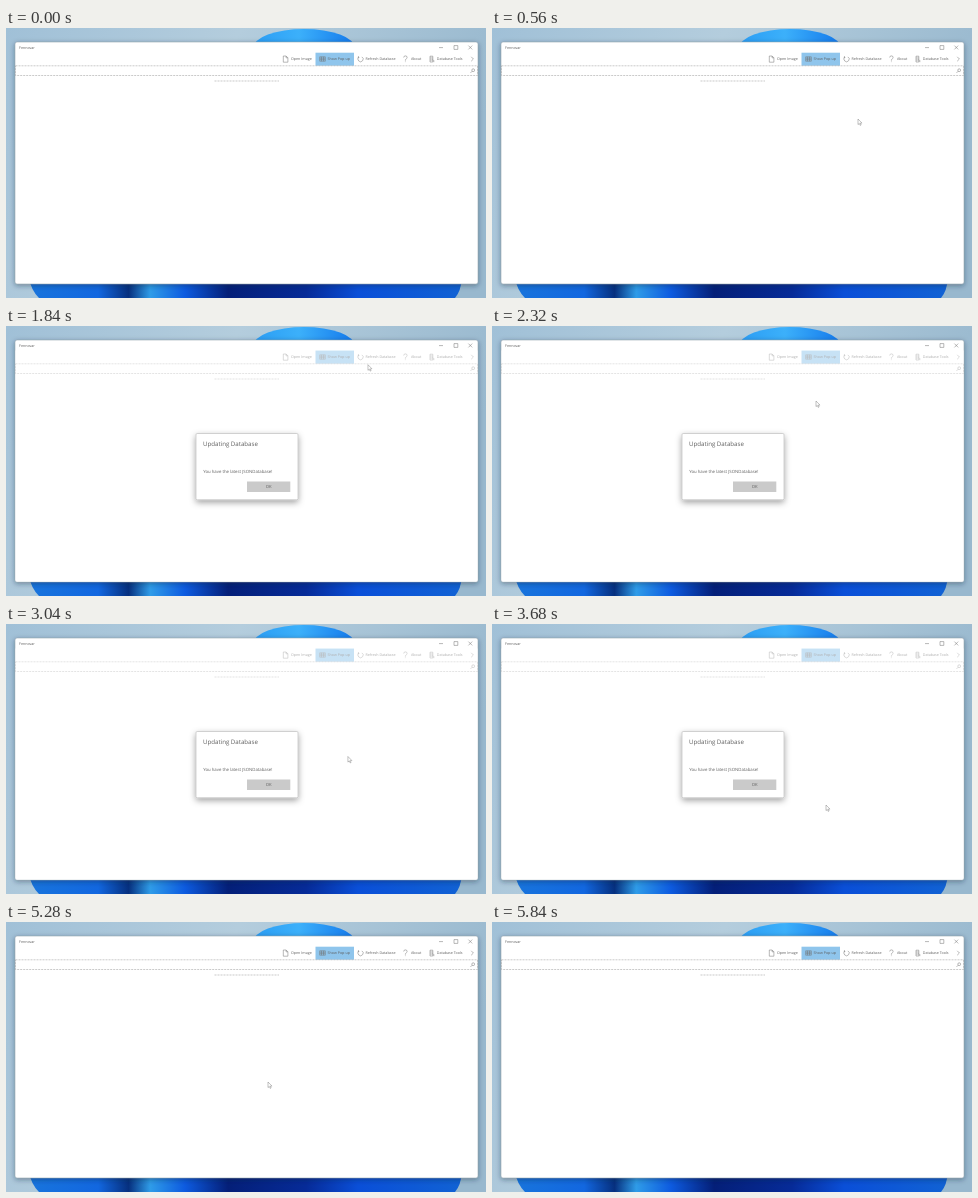
An HTML page for the animation above (5920 ms loop, 480 px wide and 270 px high).

```html
<!DOCTYPE html>
<html lang="en">
<head>
<meta charset="utf-8">
<title>Database refresh</title>
<style>
html, body { margin: 0; width: 100%; height: 100%; overflow: hidden; background: #adc8da; }
svg { display: block; width: 100%; height: 100%; }
text { font-family: "Open Sans", "Noto Sans", sans-serif; font-size: 3.65px; fill: #5e5e5e; text-rendering: geometricPrecision; }
.icon { fill: none; stroke: #707070; stroke-width: .5; }
.dash { fill: none; stroke: #a6a6a6; stroke-width: .6; stroke-dasharray: 2 1; }
</style>
</head>
<body>
<svg viewBox="0 0 480 270" preserveAspectRatio="none">
  <defs>
    <linearGradient id="sky" x2="1" y2=".3">
      <stop offset="0" stop-color="#a0c0d7"/>
      <stop offset=".45" stop-color="#b4cddd"/>
      <stop offset="1" stop-color="#98b8ce"/>
    </linearGradient>
    <linearGradient id="crest">
      <stop offset="0" stop-color="#2a9df4"/>
      <stop offset=".45" stop-color="#3cb0fa"/>
      <stop offset="1" stop-color="#1379ec"/>
    </linearGradient>
    <linearGradient id="base">
      <stop offset="0" stop-color="#1874dc"/>
      <stop offset=".16" stop-color="#1267e0"/>
      <stop offset=".23" stop-color="#06307f"/>
      <stop offset=".28" stop-color="#2f9ce8"/>
      <stop offset=".36" stop-color="#0d5be0"/>
      <stop offset=".46" stop-color="#041f78"/>
      <stop offset=".64" stop-color="#062b98"/>
      <stop offset=".76" stop-color="#0a4fd8"/>
      <stop offset="1" stop-color="#1162d4"/>
    </linearGradient>
    <filter id="winShadow" x="-5%" y="-5%" width="110%" height="115%">
      <feDropShadow dx="0" dy="1.5" stdDeviation="2.5" flood-color="#12283a" flood-opacity=".42"/>
    </filter>
    <filter id="boxShadow" x="-20%" y="-20%" width="140%" height="150%">
      <feDropShadow dx="0" dy="2.5" stdDeviation="3" flood-opacity=".38"/>
    </filter>
  </defs>

  <rect width="480" height="270" fill="url(#sky)"/>
  <ellipse cx="298" cy="20" rx="51" ry="19" fill="url(#crest)"/>
  <path d="M23 250 Q25 262 33 270 H449 Q455 263 456 250Z" fill="url(#base)"/>

  <rect x="9" y="14" width="463" height="242" rx="2" fill="#fff" stroke="#8195a3" stroke-width=".5" filter="url(#winShadow)"/>
  <text x="13" y="20.8">Fennovar</text>
  <path class="icon" d="M433 19.6h4M448 17.6h3.8v3.8h-3.8zM462.4 17.6l3.8 3.8m0-3.8l-3.8 3.8"/>

  <rect x="309.5" y="24.7" width="38.5" height="13" fill="#8fc5ec"/>
  <rect id="hover" x="348" y="24.7" width="45.2" height="13" fill="#bdbdbd"/>
  <g id="labels"></g>
  <g class="icon">
    <path d="M277.3 28h2.8l1.8 1.8v4.4h-4.6zM280.1 28v1.8h1.8"/>
    <path d="M313.7 28.8h5.6v4.4h-5.6zM313.7 30.2h5.6M313.7 31.7h5.6M315.5 28.8v4.4M317.5 28.8v4.4"/>
    <path d="M352.9 29.1A2.6 2.6 0 1 0 355.9 28.9M352.2 28.1l.8 1.2-1.4.5"/>
    <path d="M397.7 29.5q0-1.6 1.7-1.6t1.7 1.5q0 1-1 1.6t-.7 1.7M399.4 33.5v.6"/>
    <path d="M424 28.2h2.8v5.8h-2.8zM424 30h2.8M424 32h2.8M426.8 31.6l1 1v1.6"/>
    <path d="M465.2 28.8l2.2 2.2-2.2 2.2"/>
    <circle cx="467.2" cy="42.2" r="1.4"/>
    <path d="M466.2 43.2l-1.7 1.7"/>
  </g>
  <rect class="dash" x="9.5" y="37.8" width="462" height="9.7"/>
  <path class="dash" d="M208.5 53H273"/>

  <g id="dialog">
    <path d="M9.2 24.5H471.8V254a2 2 0 0 1-2 2H11.2a2 2 0 0 1-2-2Z" fill="#fff" opacity=".5"/>
    <rect x="190" y="107.5" width="102" height="66.3" rx="1.2" fill="#fff" stroke="#a6a6a6" stroke-width=".5" filter="url(#boxShadow)"/>
    <text x="197" y="120.3" style="font-size:6.15px">Updating Database</text>
    <text x="197.2" y="146.6" style="font-size:4.3px">You have the latest JSONDatabase!</text>
    <rect x="241" y="155.5" width="43.3" height="10.5" fill="#cacaca"/>
    <text x="262.6" y="162.3" text-anchor="middle" style="font-size:4.2px">OK</text>
  </g>

  <path id="cursor" d="M0 0V5.6L1.3 4.4 2.2 6.4 3.1 6 2.3 4.1H4Z" fill="#fff" stroke="#777" stroke-width=".45"/>
</svg>
<script>
const LOOP = 5920, STEP = 80;
const OPEN = 1680, CLOSE = 5280;
const HOVER_FROM = 1120;
const $ = id => document.getElementById(id);

const labels = [
  ["Open Image", 285], ["Show Pop-up", 321.6], ["Refresh Database", 359.5],
  ["About", 405], ["Database Tools", 430.8]
];
for (const [name, x] of labels) {
  const label = document.createElementNS("http://www.w3.org/2000/svg", "text");
  label.setAttribute("x", x);
  label.setAttribute("y", 32.3);
  label.textContent = name;
  $("labels").append(label);
}

// Pointer stops: time, x, y
const stops = [
  [0, 352, 278], [560, 366, 91], [1200, 369, 32], [1680, 369, 32],
  [2320, 324, 75], [3000, 342, 132], [3680, 334, 181], [4160, 300, 190],
  [4640, 243, 177], [5040, 262, 160], [5280, 262, 160], [5760, 270, 278], [LOOP, 270, 278]
];

function pointerAt(t) {
  const i = stops.findIndex(s => s[0] > t);
  const [t0, x0, y0] = stops[i - 1], [t1, x1, y1] = stops[i];
  const p = (t - t0) / (t1 - t0), e = p * p * (3 - 2 * p);
  return [x0 + (x1 - x0) * e, y0 + (y1 - y0) * e];
}

const show = (id, on) => $(id).setAttribute("visibility", on ? "visible" : "hidden");

function draw(t) {
  const [x, y] = pointerAt(t);
  $("cursor").setAttribute("transform", `translate(${x.toFixed(2)} ${y.toFixed(2)})`);
  show("hover", t >= HOVER_FROM && t < OPEN);
  show("dialog", t >= OPEN && t < CLOSE);
}

const start = performance.now();
function tick() {
  const t = (performance.now() - start) % LOOP;
  draw(Math.floor(t / STEP) * STEP);
  requestAnimationFrame(tick);
}
tick();
</script>
</body>
</html>
```
